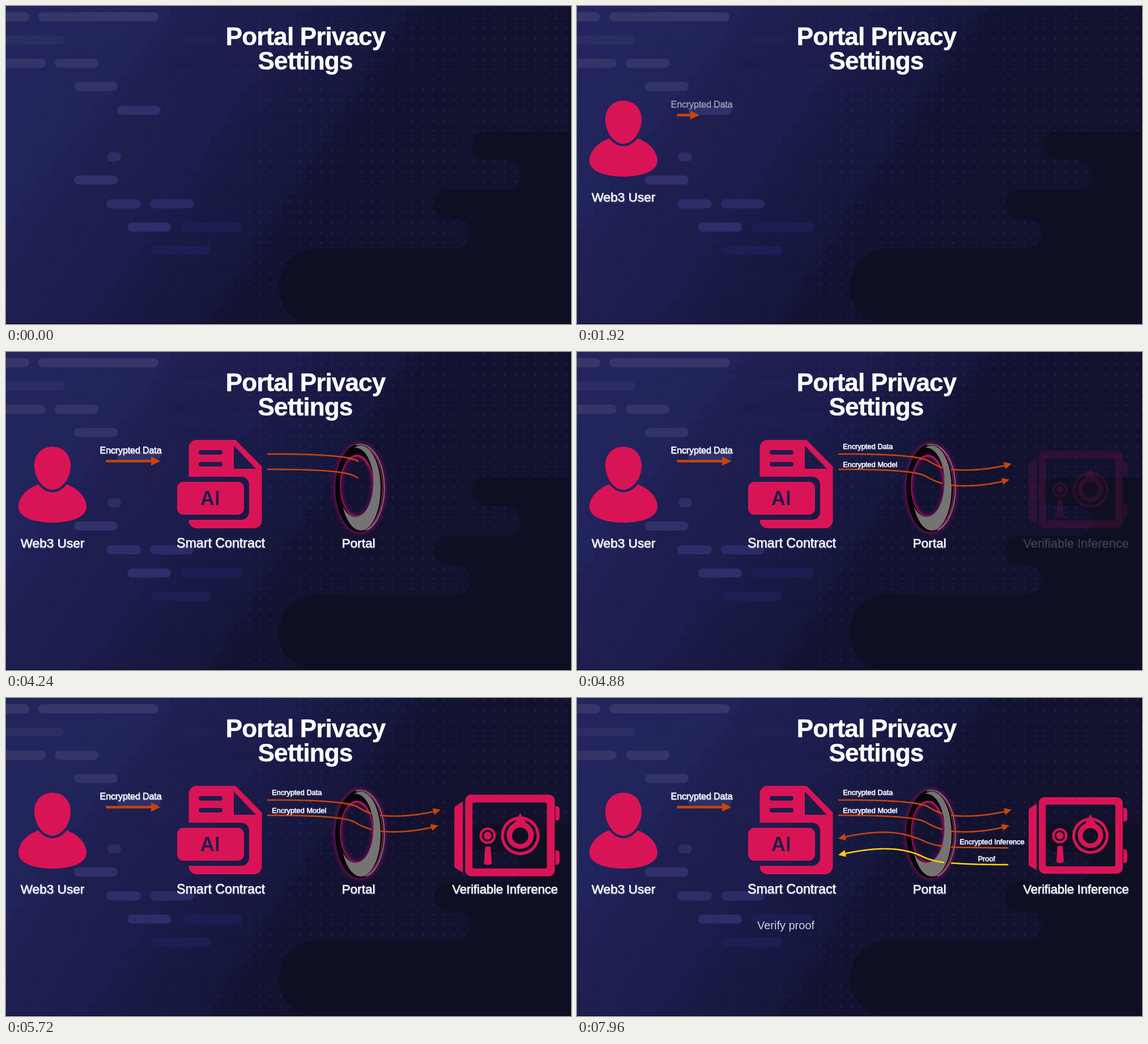
Animation of 997x561 px, one loop 8 s. Source, as an HTML page with a canvas:

```html
<!DOCTYPE html>
<html lang="en">
<head>
<meta charset="utf-8">
<title>Portal Privacy Settings</title>
<style>
  html, body { margin: 0; width: 100%; height: 100%; overflow: hidden; background: #141432; }
  canvas { display: block; width: 997px; height: 561px; }
</style>
</head>
<body>
<canvas id="stage" width="997" height="561"></canvas>
<script>
const W = 997, H = 561, LOOP = 8000;
const PINK = '#d91456', ORANGE = '#c8440a', YELLOW = '#fdd200', INK = '#1c1c4a';
const SANS = '"Liberation Sans", Arial, sans-serif';
const ctx = document.getElementById('stage').getContext('2d');

const ramp = (t, start, length) => Math.min(1, Math.max(0, (t - start) / length));
const ease = p => (1 - Math.cos(Math.PI * p)) / 2;

function group(g, alpha, draw) {
  if (alpha <= 0) return;
  g.save();
  g.globalAlpha = alpha;
  draw(g);
  g.restore();
}

function text(str, x, y, size, { weight = 400, align = 'center', track = 0, bold = 0, glow = 0 } = {}) {
  ctx.font = `${weight} ${size}px ${SANS}`;
  ctx.textAlign = align;
  ctx.letterSpacing = track + 'px';
  ctx.fillStyle = ctx.strokeStyle = '#fff';
  if (glow) {
    ctx.shadowColor = 'rgba(190,190,240,.6)';
    ctx.shadowBlur = glow;
    ctx.shadowOffsetX = ctx.shadowOffsetY = 0.8;
  }
  ctx.fillText(str, x, y);
  ctx.shadowColor = 'transparent';
  if (bold) {
    ctx.lineWidth = bold;
    ctx.lineJoin = 'round';
    ctx.strokeText(str, x, y);
  }
}
const title = (str, x, y) => text(str, x, y, 44, { weight: 700, track: -0.85, bold: 0.5 });
const caption = (str, x, size = 22.6, track = 0) => text(str, x, 345, size, { track, bold: 0.45, glow: 2 });
const note = (str, x, y, align = 'left') => text(str, x, y, 13, { align, track: -0.1, bold: 0.4, glow: 1.5 });

// ---- background ----
function backdrop() {
  const c = document.createElement('canvas');
  c.width = W; c.height = H;
  const g = c.getContext('2d');
  let seed = 11;
  const rand = () => (seed = seed * 16807 % 2147483647) / 2147483647;

  const base = g.createLinearGradient(0, 0, 670, 437);
  [[0, '#23255f'], [0.3, '#21235a'], [0.36, '#202154'], [0.54, '#1e1f50'],
   [0.6, '#1d1e4c'], [0.73, '#1a1b43'], [0.79, '#18183a'], [1, '#171736']]
    .forEach(([at, color]) => base.addColorStop(at, color));
  g.fillStyle = base;
  g.fillRect(0, 0, W, H);

  // ragged diagonal edges
  for (const [top, slope, alpha] of [[300, 0.78, 0.07], [530, 0.7, 0.08], [718, 0.65, 0.13]]) {
    g.fillStyle = `rgba(8,8,30,${alpha})`;
    for (let y = 0; y < H; y += 10) g.fillRect(top - y * slope + (rand() - 0.5) * 22, y, W, 10);
  }

  const fade = g.createLinearGradient(200, 0, 480, 0);
  fade.addColorStop(0, 'rgba(62,62,150,0)');
  fade.addColorStop(1, 'rgba(62,62,150,.18)');
  g.fillStyle = fade;
  g.beginPath();
  for (let y = 4; y < H; y += 18)
    for (let x = 214; x < W; x += 18) {
      g.moveTo(x + 2.3, y);
      g.arc(x, y, 2.3, 0, 7);
    }
  g.fill();

  const pills = [
    ['#363669', -20, 41, 11], ['#363669', 57, 269, 11], ['#2b2c61', -20, 103, 52],
    ['#343469', -20, 70, 93], ['#343469', 86, 163, 93], ['#323367', 120, 197, 134],
    ['#2f306a', 196, 273, 176], ['#2d2e68', 179, 203, 258], ['#30316a', 120, 197, 299],
    ['#2c2d69', 177, 238, 341], ['#2a2b66', 254, 331, 341], ['#2c2d6b', 214, 291, 382],
    ['#1c1d52', 309, 417, 382], ['#1d1e53', 257, 361, 423], ['#1c1d4d', 309, 405, 134],
    ['#1f2054', 302, 370, 52], ['#1c1d4f', 289, 379, 93], ['#1b1c4a', 396, 440, 93]
  ];
  for (const [color, left, right, y] of pills) {
    g.fillStyle = color;
    g.beginPath();
    g.roundRect(left, y, right - left, 16, 8);
    g.fill();
  }

  const q = Math.PI / 2;
  g.fillStyle = '#0f0f23';
  g.beginPath();
  g.moveTo(W, 221);
  g.arc(848, 246.5, 25.5, -q, q, true);
  g.arc(883, 298, 26, -q, q);
  g.arc(781, 350, 26, -q, q, true);
  g.arc(794, 402, 26, -q, q);
  g.arc(548, 495, 67, -q, q, true);
  g.lineTo(W, 562);
  g.fill();
  g.fillStyle = '#06060f';
  g.fillRect(0, 560, W, 1);
  g.fillRect(996, 0, 1, H);
  return c;
}

// ---- icons ----
const USER = new Path2D(`M82 167C102 167 114 182 114 200C114 222 99 243 82 243C65 243 50 222 50 200C50 182 62 167 82 167Z
  M57 233.5C72 252 92 252 107 233.5C128 241 142 257 142 273C142 292 113 301 82 301C51 301 22 292 22 273C22 257 36 241 57 233.5Z`);

const SHEET = new Path2D(`M337 155H405L451.500 202V297A14 14 0 0 1 437.500 311H337A14 14 0 0 1 322.500 297V169A14 14 0 0 1 337 155Z
  M322.500 220H415A14 14 0 0 1 429 234V282A14 14 0 0 1 415 296H322.500Z
  M402 165V206H441Z`);
SHEET.roundRect(340, 173, 42, 8, 4);
SHEET.roundRect(340, 194, 42, 8, 4);
const BADGE = new Path2D();
BADGE.roundRect(302, 229, 118, 58, 11);

const SAFE = new Path2D('M797 196L811 186V304L797 295ZM848 261H857L859 288Q859 291 852 291Q846 291 846 288Z');
SAFE.roundRect(815, 175, 148, 135, 10);
SAFE.roundRect(827, 188, 123, 109, 3);
SAFE.roundRect(964, 194, 7, 24, [0, 5, 5, 0]);
SAFE.roundRect(964, 267, 7, 24, [0, 5, 5, 0]);
for (const [x, radii] of [[852, [13.5, 9.5, 6.5]], [906, [32, 27]]])
  for (const r of radii) {
    SAFE.moveTo(x + r, 243);
    SAFE.arc(x, 243, r, 0, 7);
    SAFE.closePath();
  }
const DIAL = new Path2D(`M906 205Q911 216 916 222A22.500 22.500 0 1 1 896 222Q901 216 906 205Z
  M919.500 243A13.500 13.500 0 1 1 892.500 243A13.500 13.500 0 1 1 919.500 243Z`);

function user(g) {
  g.fillStyle = PINK;
  g.fill(USER);
  caption('Web3 User', 82);
}

function contract(g) {
  g.fillStyle = PINK;
  g.fill(SHEET, 'evenodd');
  g.fill(BADGE);
  g.fillStyle = INK;
  g.font = '600 34px Inter, "Open Sans", sans-serif';
  g.textAlign = 'center';
  g.letterSpacing = '0.5px';
  g.fillText('AI', 360.5, 270);
  caption('Smart Contract', 379, 23.2);
}

function portal(g) {
  const oval = (x, y, rx, ry) => {
    const p = new Path2D();
    p.ellipse(x, y, rx, ry, 0, 0, Math.PI * 2);
    return p;
  };
  const hole = oval(619, 236, 29, 54);
  const ring = oval(624.5, 240, 43.5, 78);
  ring.addPath(hole);
  g.save();
  g.shadowColor = 'rgba(214,18,120,.8)';
  g.shadowBlur = 10;
  g.fillStyle = '#08030a';
  g.fill(ring, 'evenodd');
  g.restore();

  // pink rim, strongest at the top of the opening
  g.strokeStyle = '#b0125f';
  g.lineWidth = 1.5;
  g.stroke(hole);
  g.lineWidth = 3;
  g.beginPath();
  g.ellipse(619, 236, 28, 53, 0, -2.1, -0.7);
  g.stroke();
  g.lineWidth = 1.5;
  g.beginPath();
  g.ellipse(625, 240, 39.5, 76, 0, -1.2, 1.4);
  g.stroke();

  g.save();
  const outside = new Path2D('M560 140H690V340H560Z');
  outside.addPath(oval(617, 230, 31.5, 61));
  g.clip(outside, 'evenodd');
  g.fillStyle = '#747474';
  g.fill(oval(626, 240, 35, 75));
  g.restore();

  g.strokeStyle = '#747474';
  g.lineWidth = 2;
  g.beginPath();
  g.ellipse(625, 240, 42.500, 77, 0, -1.75, 1.3);
  g.stroke();
  caption('Portal', 622);
}

function safe(g, scale) {
  g.save();
  g.translate(884, 243);
  g.scale(scale, scale);
  g.translate(-884, -243);
  g.fillStyle = PINK;
  g.fill(SAFE, 'evenodd');
  g.fill(DIAL, 'evenodd');
  g.restore();
  caption('Verifiable Inference', 880.5, 22, -0.1);
}

// ---- arrows ----
// Chain of cubic Béziers, sampled with running length.
function curve(...v) {
  const pts = [{ x: v[0], y: v[1], s: 0 }];
  for (let i = 2; i < v.length; i += 6) {
    const a = pts[pts.length - 1];
    for (let k = 1; k <= 30; k++) {
      const u = k / 30, w = 1 - u;
      const mix = (p, j) => w * w * w * p + 3 * w * w * u * v[i + j] + 3 * w * u * u * v[i + 2 + j] + u * u * u * v[i + 4 + j];
      const x = mix(a.x, 0), y = mix(a.y, 1), last = pts[pts.length - 1];
      pts.push({ x, y, s: last.s + Math.hypot(x - last.x, y - last.y) });
    }
  }
  return pts;
}

function trace(pts, part, color, head = 0, width = 2.6) {
  if (part <= 0) return;
  const end = part * pts[pts.length - 1].s;
  const pointAt = s => {
    s = Math.max(0, s);
    const i = Math.max(1, pts.findIndex(p => p.s >= s - 1e-6));
    const a = pts[i - 1], b = pts[i], u = (s - a.s) / (b.s - a.s);
    return { x: a.x + (b.x - a.x) * u, y: a.y + (b.y - a.y) * u };
  };
  const neck = Math.max(0, end - head * 0.8), stop = pointAt(neck);
  ctx.strokeStyle = ctx.fillStyle = color;
  ctx.lineWidth = width;
  ctx.lineJoin = 'round';
  ctx.lineCap = 'butt';
  ctx.beginPath();
  ctx.moveTo(pts[0].x, pts[0].y);
  for (const p of pts) if (p.s > 0 && p.s < neck) ctx.lineTo(p.x, p.y);
  ctx.lineTo(stop.x, stop.y);
  ctx.stroke();
  if (!head || end < 1) return;
  const tip = pointAt(end), back = pointAt(end - head);
  ctx.save();
  ctx.translate(tip.x, tip.y);
  ctx.rotate(Math.atan2(tip.y - back.y, tip.x - back.x));
  ctx.beginPath();
  ctx.moveTo(0, 0);
  ctx.lineTo(-head, -head * 0.48);
  ctx.lineTo(-head, head * 0.48);
  ctx.fill();
  ctx.restore();
}

const feed = curve(176.5, 192.5, 200, 192.5, 245, 192.5, 272.5, 192.5);
const out = [
  [curve(461, 180, 530, 179.500, 604, 182, 621, 192.500, 628, 197, 636, 201, 645, 204),
   curve(660, 207, 692, 210.500, 732, 207, 767, 197)],
  [curve(461, 207, 520, 207, 600, 208, 617, 220, 625, 225, 635, 229, 645, 232),
   curve(660, 235, 692, 238, 728, 235, 763, 225)]
];
const home = [
  [ORANGE, curve(761, 264.500, 728, 264, 690, 264, 660, 263),
   curve(648, 261.500, 620, 259, 613, 251, 596, 246, 560, 233, 518, 234, 461, 248)],
  [YELLOW, curve(761, 294, 728, 294, 690, 293.500, 660, 291),
   curve(648, 290, 620, 287, 613, 280, 596, 274, 560, 262, 518, 264, 461, 277)]
];

// ---- timeline ----
const bg = backdrop();

function render(t) {
  ctx.drawImage(bg, 0, 0);
  title('Portal Privacy', 528.5, 69);
  title('Settings', 528, 112);

  group(ctx, ramp(t, 1060, 430), user);

  const feedPart = ease(ramp(t, 1490, 970));
  group(ctx, feedPart, () => text('Encrypted Data', 220, 179, 16, { track: -0.1, bold: 0.45, glow: 1.5 }));
  trace(feed, feedPart, ORANGE, 16.5, 4.6);

  group(ctx, ramp(t, 2440, 430), contract);
  group(ctx, ramp(t, 2890, 530), portal);

  const enter = ease(ramp(t, 3480, 1000)), leave = ease(ramp(t, 4440, 430));
  for (const [near, far] of out) {
    trace(near, enter, ORANGE);
    trace(far, leave, ORANGE, 13);
  }
  group(ctx, ramp(t, 4370, 450), () => {
    note('Encrypted Data', 469, 171);
    note('Encrypted Model', 469, 202.5);
  });

  const pulse = 1 + 0.075 * Math.sin(Math.PI * ramp(t, 5250, 780)) ** 2;
  group(ctx, ramp(t, 4820, 430), g => safe(g, pulse));

  const back = ease(ramp(t, 6070, 560)), arrive = ease(ramp(t, 6630, 800));
  for (const [color, far, near] of home) {
    trace(far, back, color);
    trace(near, arrive, color, 13);
  }
  group(ctx, ramp(t, 7190, 430), () => {
    note('Encrypted Inference', 675, 258);
    note('Proof', 722.5, 288, 'center');
  });
  group(ctx, ramp(t, 7616, 430), () => text('Verify proof', 368.5, 408, 20));
}

function tick() {
  render(performance.now() % LOOP);
  requestAnimationFrame(tick);
}
tick();
</script>
</body>
</html>
```
